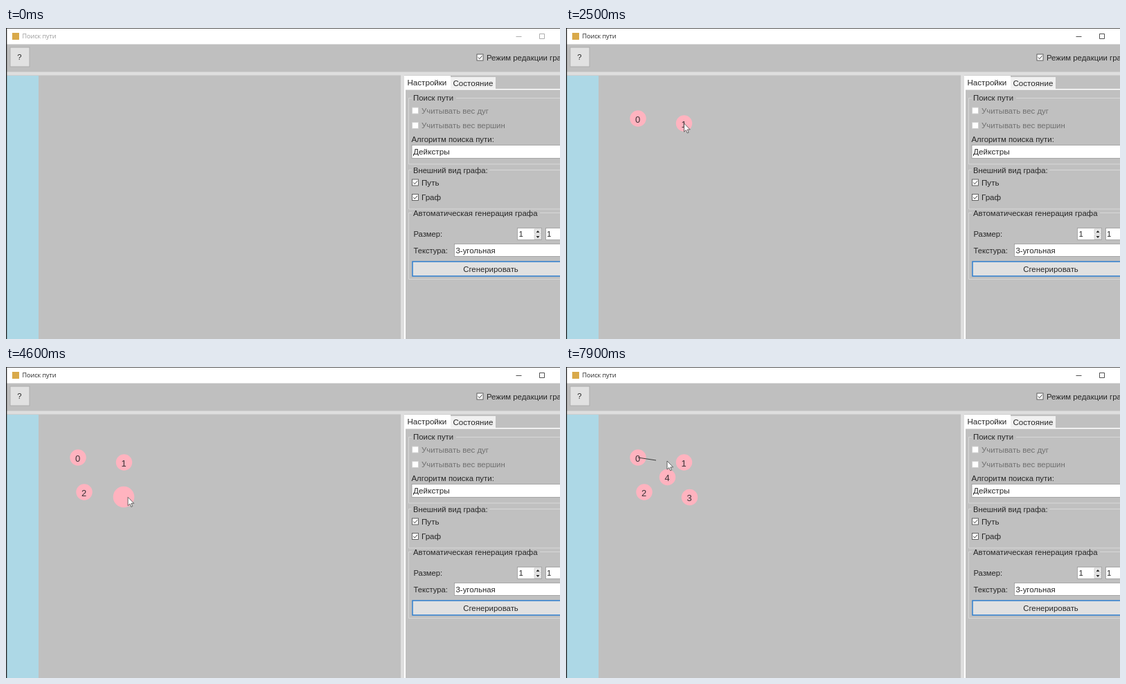
Write an HTML page that moves like this. It is 800 px wide and 450 px high and loops after 8000 ms.

```html
<!DOCTYPE html>
<html lang="ru">
<head>
<meta charset="utf-8">
<style>
html, body { margin: 0; width: 100%; height: 100%; overflow: hidden; }
svg { display: block; width: 800px; height: 450px; background: #c0c0c0; font: 11.4px "Liberation Sans", Arial, sans-serif; fill: #262626; }
.title { font: 9px "Open Sans", "Noto Sans", sans-serif; }
.mid { text-anchor: middle; }
.off { fill: #707070; }
.field { fill: #fff; stroke: #999; stroke-width: .8; }
.group { fill: none; stroke: #d8d8d8; }
.node { fill: #ffb3bf; }
.line { fill: none; stroke: #3a3a3a; }
#nodes text { font-size: 13px; fill: #3a3035; }
</style>
</head>
<body>
<svg viewBox="0 0 800 450">
  <defs>
    <clipPath id="field"><rect x="47" y="69" width="523" height="381"/></clipPath>
    <rect id="boxOff" x=".5" y=".5" width="9" height="9" fill="#fff" stroke="#d0d0d0"/>
    <g id="box">
      <rect x=".5" y=".5" width="9" height="9" fill="#fff" stroke="#555" stroke-width=".9"/>
      <path class="line" d="M2.3 5l2 2.2L8 2.8"/>
    </g>
  </defs>

  <rect width="800" height="23.7" fill="#fff"/>
  <rect x="9" y="7" width="10" height="10" fill="#d9a94a"/>
  <g id="caption">
    <text class="title" x="23.5" y="15.3">Поиск пути</text>
    <path d="M736.5 12.5h8M770.5 8.5h7v7h-7z" fill="none" stroke="currentColor" stroke-width=".8"/>
  </g>

  <rect y="23.7" width="800" height="40" fill="#bfbfbf"/>
  <rect x="6" y="28" width="28" height="28" fill="#e1e1e1" stroke="#adadad"/>
  <text class="mid" x="19.3" y="46">?</text>
  <use href="#box" x="679.5" y="37.5"/>
  <text x="694" y="47">Режим редакции графа</text>
  <path d="M0 63.5h800v5H0zM570 63.5h5V450h-5z" fill="#dedede"/>
  <rect x="1" y="69" width="46" height="381" fill="#add8e6"/>

  <path d="M575 69h67v19h158v1.5H577V450h-2z" fill="#fff"/>
  <rect x="642" y="71" width="65" height="17" fill="#f0f0f0"/>
  <text x="579.5" y="82.5" font-size="11.6">Настройки</text>
  <text x="645.5" y="83.5" font-size="11.6">Состояние</text>

  <path class="group" d="M586 101.5h-4.5V197H800M650 101.5h150M586 205.5h-4.5V262H800M698 205.5h102M586 267.5h-4.5v96H800M771 267.5h29"/>
  <text x="588" y="105">Поиск пути</text>
  <use href="#boxOff" x="586" y="114.5"/>
  <text class="off" x="600" y="123.5">Учитывать вес дуг</text>
  <use href="#boxOff" x="586" y="136"/>
  <text class="off" x="600" y="145">Учитывать вес вершин</text>
  <text x="585.5" y="165">Алгоритм поиска пути:</text>
  <rect class="field" x="586" y="169.5" width="220" height="19"/>
  <text x="588" y="183.3" font-size="11.8">Дейкстры</text>

  <text x="588" y="209.5" font-size="11.2">Внешний вид графа:</text>
  <use href="#box" x="586" y="218.5"/>
  <text x="600" y="228" font-size="11.6">Путь</text>
  <use href="#box" x="586" y="240"/>
  <text x="600" y="249.3" font-size="11.6">Граф</text>

  <text x="588" y="271.5">Автоматическая генерация графа</text>
  <text x="588.5" y="301.8" font-size="11.2">Размер:</text>
  <rect class="field" x="738.5" y="289.5" width="35" height="17"/>
  <path d="M763 291h10v6.5h-10zM763 299h10v6.5h-10z" fill="#e8e8e8" stroke="#bbb" stroke-width=".6"/>
  <path d="M765.5 296l2.5-3 2.5 3zM765.5 301l2.5 3 2.5-3z"/>
  <rect class="field" x="779.5" y="289.5" width="30" height="17"/>
  <text x="740.5" y="301.8">1</text>
  <text x="781" y="301.8">1</text>
  <text x="588.5" y="325.8" font-size="11.2">Текстура:</text>
  <rect class="field" x="647.5" y="312.5" width="160" height="18"/>
  <text x="649.5" y="325.8">3-угольная</text>
  <rect x="587" y="338" width="226" height="21" fill="#e1e1e1" stroke="#2f7fd0" stroke-width="1.5"/>
  <text class="mid" x="700" y="353">Сгенерировать</text>

  <path d="M0 0h800v.7H1.3V450H0z" fill="#222"/>
  <g id="nodes"></g>
  <g clip-path="url(#field)"><circle id="ghost" class="node" r="15.3"/></g>
  <path id="edge" class="line"/>
  <path id="cursor" d="M0 0V12.2L2.8 9.6 4.7 14 6.6 13.2 4.8 8.9H8.7z" fill="#fff" stroke="#444" stroke-width=".8"/>
</svg>
<script>
const DURATION = 8000, STEP = 100, ACTIVATE = 1100, EDGE_START = 7600;
const [caption, nodeLayer, ghost, edge, cursor] =
  ["caption", "nodes", "ghost", "edge", "cursor"].map(id => document.getElementById(id));

// Places where the pointer pauses: arrive, leave, x, y, what it does on leaving
const stops = [
  [300, 600, 153, 193],
  [900, 1100, 29, 123, "grab"],
  [1400, 1500, 104, 131, "drop"],
  [1800, 2000, 26, 151, "grab"],
  [2400, 2500, 170.5, 138, "drop"],
  [3000, 3000, 24, 164, "grab"],
  [3700, 3700, 113, 181, "drop"],
  [4000, 4100, 28, 168, "grab"],
  [4500, 4500, 170, 188],
  [4700, 4800, 178.5, 188.5, "drop"],
  [5100, 5200, 25, 167, "grab"],
  [5400, 5400, 110, 232],
  [5500, 5500, 147, 237],
  [5700, 5700, 172, 208],
  [6300, 6600, 146.5, 159.5, "drop"],
  [7200, 7500, 101, 131],
  [EDGE_START, EDGE_START, 104, 131],
  [7800, 7800, 130, 135],
  [7900, DURATION, 146, 136]
].map(([arrive, leave, x, y, action]) => ({ arrive, leave, x, y, action }));

const actions = stops.filter(s => s.action);
const nodes = actions.filter(s => s.action === "drop");
nodeLayer.innerHTML = nodes.map(({ x, y }, i) =>
  `<g><circle class="node" cx="${x}" cy="${y}" r="11.7"/><text class="mid" x="${x - .3}" y="${y + 5.5}">${i}</text></g>`).join("");

const easeOut = k => 1 - (1 - k) ** 1.8;
const show = (el, on) => el.style.display = on ? "" : "none";

function pointer(t) {
  const i = Math.max(0, stops.findIndex(s => t <= s.leave));
  const to = stops[i], from = stops[i - 1];
  if (!from || t >= to.arrive) return [to.x, to.y];
  const k = easeOut((t - from.leave) / (to.arrive - from.leave));
  return [from.x + (to.x - from.x) * k, from.y + (to.y - from.y) * k];
}

function draw(now) {
  const t = Math.floor(now % DURATION / STEP) * STEP;
  const lag = pointer(t - STEP); // dragged shapes trail the pointer

  caption.style.fill = caption.style.color = t < ACTIVATE ? "#999" : "#222";
  nodes.forEach((n, i) => show(nodeLayer.children[i], t >= n.leave));

  const next = actions.find(s => t < s.leave);
  show(ghost, next?.action === "drop");
  ghost.setAttribute("transform", `translate(${lag})`);

  show(edge, t > EDGE_START);
  edge.setAttribute("d", `M${nodes[0].x} ${nodes[0].y}L${lag}`);

  show(cursor, t >= stops[0].arrive);
  cursor.setAttribute("transform", `translate(${pointer(t)})`);
  requestAnimationFrame(draw);
}
requestAnimationFrame(draw);
</script>
</body>
</html>
```
